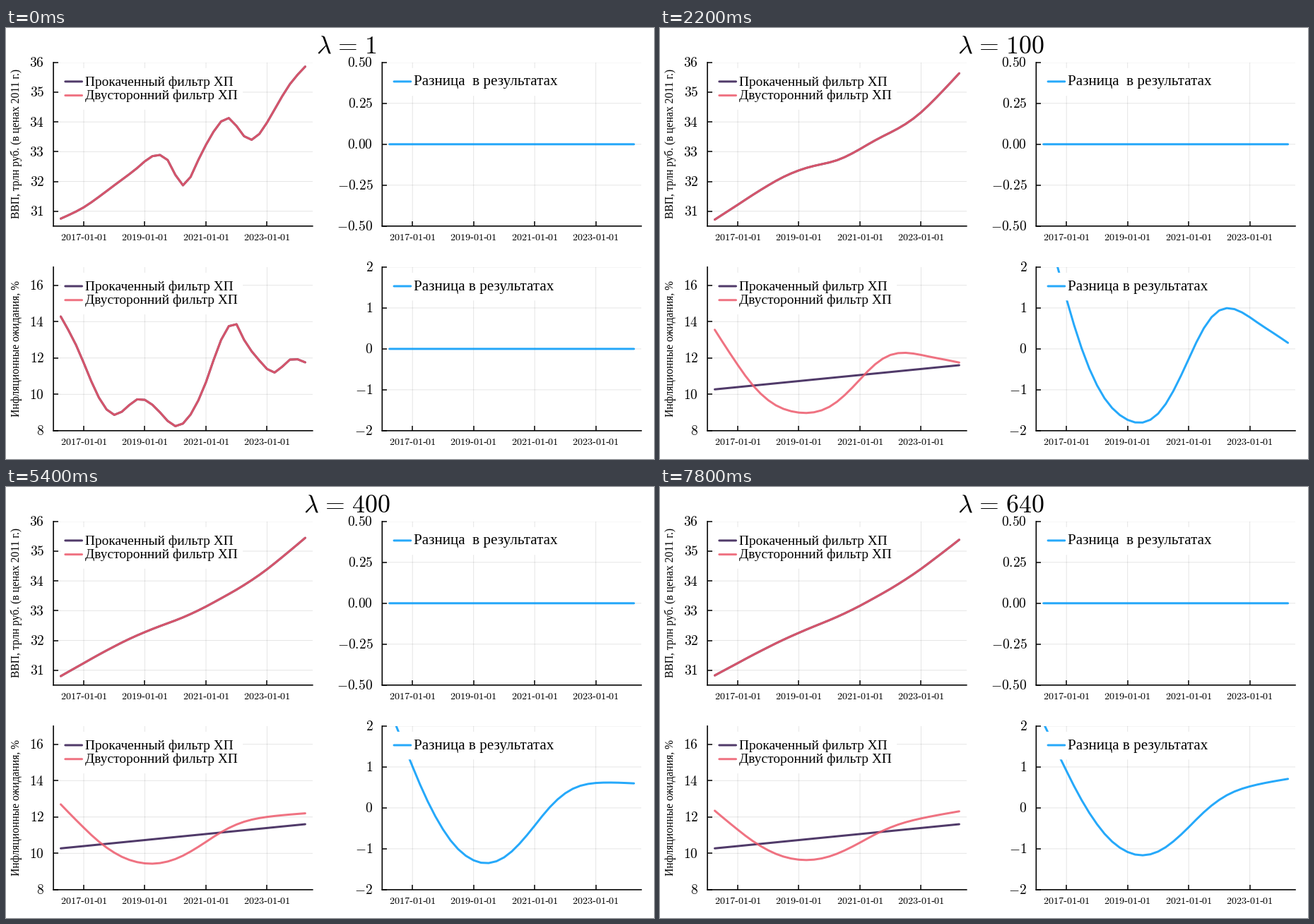
Recreate the animation shown at these times as a matplotlib script. Size 917 by 611 pixels, loop 8000 ms.

```python
import numpy as np
import matplotlib.pyplot as plt
from matplotlib.animation import FuncAnimation
from matplotlib.lines import Line2D
from matplotlib.patches import Rectangle
from matplotlib.transforms import Affine2D

W, H, DPI = 917, 611, 100
PT = 72 / DPI                      # points per pixel
plt.rcParams.update({"font.family": "Liberation Serif",
                     "mathtext.fontset": "cm",
                     "path.snap": False})

PURPLE = (49 / 255, 23 / 255, 79 / 255)
CORAL = (237 / 255, 90 / 255, 108 / 255)
BLUE = "#009afa"
ALPHA = 0.85

fig = plt.figure(figsize=(W / DPI, H / DPI), dpi=DPI, facecolor="white")
pixels = Affine2D().scale(1 / W, -1 / H).translate(0, 1) + fig.transFigure

# Quarterly dates in days
months = np.arange("2016-04", "2024-05", 3, dtype="datetime64[M]")
days = months.astype("datetime64[D]").astype(float)
pad = 0.03 * (days[-1] - days[0])
YEARS = range(2017, 2024, 2)
year_days = [np.datetime64(f"{y}-01-01").astype(float) for y in YEARS]

N = len(days)
second_diff = np.diff(np.eye(N), 2, axis=0)
PENALTY = second_diff.T @ second_diff


def smoother(lam):
    return np.linalg.inv(np.eye(N) + lam * PENALTY)


def raw_series(keys):
    """Smoothest path through {quarter: value}, with lambda = 1 undone."""
    weight, value = np.zeros(N), np.zeros(N)
    for k, v in keys.items():
        weight[k], value[k] = 1, v
    trend = np.linalg.solve(np.diag(weight) + 1e-6 * PENALTY, value)
    return trend + PENALTY @ trend


gdp = raw_series({0: 30.75, 3: 31.13, 7: 31.87, 10: 32.45, 13: 32.89,
                  14: 32.72, 16: 31.87, 18: 32.72, 20: 33.67, 22: 34.13,
                  24: 33.52, 25: 33.40, 27: 33.98, 30: 35.27, 32: 35.86})
infl = raw_series({0: 14.28, 2: 12.71, 5: 9.82, 7: 8.87, 10: 9.725,
                   13: 9.01, 15: 8.25, 17: 8.89, 19: 10.67, 22: 13.75,
                   23: 13.855, 24: 13.0, 26: 11.86, 28: 11.2, 30: 11.91,
                   32: 11.76})


def passes(lam):
    """Number of repeated filter passes for the inflation series."""
    if lam < 28:
        return 1
    return 2 if lam < 90 else 600


def lam_at(i):
    return 1 + 9 * i if i < 12 else 100 + 20 * (i - 12)


def label(x, y, s, px, **kw):
    return fig.text(x, y, s, transform=pixels, fontsize=px * PT,
                    **{"va": "baseline", **kw})


def panel(left, top, lo, hi, ticks, fmt):
    width, height = 366.7, 232
    ax = fig.add_axes([left / W, 1 - (top + height) / H, width / W, height / H])
    ax.set_xlim(days[0] - pad, days[-1] + pad)
    ax.set_ylim(lo, hi)
    ax.set_xticks(year_days)
    ax.set_yticks(ticks)
    ax.set_axisbelow(True)
    ax.grid(color="black", alpha=0.1, lw=1 * PT)
    ax.tick_params(direction="in", length=7 * PT, width=1.5 * PT,
                   labelleft=False, labelbottom=False)
    for side in ("top", "right"):
        ax.spines[side].set_visible(False)
    for side in ("left", "bottom"):
        ax.spines[side].set_linewidth(1.6 * PT)

    for t in ticks:
        y = top + height * (hi - t) / (hi - lo)
        label(left - 13, y + 6.4, f"${t:{fmt}}$", 19.5, ha="right")
    span = days[-1] - days[0] + 2 * pad
    for year, d in zip(YEARS, year_days):
        x = left + width * (d - days[0] + pad) / span
        label(x, top + height + 20, f"${year}$\u2010$01$\u2010$01$", 14.15,
              ha="center")
    return ax


def curve(ax, color):
    line, = ax.plot(days, np.zeros(N), color=color, alpha=ALPHA, lw=3 * PT,
                    solid_capstyle="round", solid_joinstyle="round")
    return line


def legend(left, top, width, px, entries):
    """White box over the plot with a line sample and a name per row."""
    row = 19.7
    fig.add_artist(Rectangle((left + 10, top + 8), width,
                             row * (len(entries) + 1), transform=pixels,
                             facecolor="white", edgecolor="none"))
    for k, (name, color) in enumerate(entries):
        y = top + 8 + row * (k + 1)
        fig.add_artist(Line2D([left + 16.7, left + 40.5], [y - 0.6] * 2,
                              transform=pixels, color=color, alpha=ALPHA,
                              lw=3 * PT, solid_capstyle="round"))
        label(left + 44.6, y + 5, name, px)


LEFT, RIGHT, TOP, BOTTOM = 67.1, 532.3, 48.8, 338.9
ax_gdp = panel(LEFT, TOP, 30.5, 36, range(31, 37), "d")
ax_gdp_gap = panel(RIGHT, TOP, -0.5, 0.5, np.linspace(-0.5, 0.5, 5), ".2f")
ax_infl = panel(LEFT, BOTTOM, 8, 17, range(8, 17, 2), "d")
ax_infl_gap = panel(RIGHT, BOTTOM, -2, 2, range(-2, 3), "d")

filters = [("Прокаченный фильтр ХП", PURPLE), ("Двусторонний фильтр ХП", CORAL)]
for top, gap_name in ((TOP, "Разница  в результатах"),
                      (BOTTOM, "Разница в результатах")):
    legend(LEFT, top, 258, 19.4, filters)
    legend(RIGHT, top, 246, 21.1, [(gap_name, BLUE)])

for y, name in ((164.5, "ВВП, трлн руб. (в ценах 2011 г.)"),
                (454.5, "Инфляционные ожидания, %")):
    label(19, y, name, 15.65, rotation=90, rotation_mode="anchor", ha="center")

TITLE_EM = 35.8
title = label(0, 36, "", TITLE_EM)
gdp_boost, gdp_two = curve(ax_gdp, PURPLE), curve(ax_gdp, CORAL)
infl_boost, infl_two = curve(ax_infl, PURPLE), curve(ax_infl, CORAL)
gdp_gap, infl_gap = curve(ax_gdp_gap, BLUE), curve(ax_infl_gap, BLUE)


def draw(i):
    lam = lam_at(i)
    s = smoother(lam)
    title.set_text(rf"$\lambda\hspace{{0.117}}=\hspace{{0.117}}{lam}$")
    # centre by advance width, so the digits' side bearings count
    title.set_x(482.4 - TITLE_EM * (1.92 + 0.5 * len(str(lam))) / 2)

    trend = s @ gdp
    gdp_boost.set_ydata(trend)
    gdp_two.set_ydata(trend)

    two = s @ infl
    boost = np.linalg.matrix_power(s, passes(lam)) @ infl
    infl_boost.set_ydata(boost)
    infl_two.set_ydata(two)
    infl_gap.set_ydata(two - boost)
    return title, gdp_boost, gdp_two, infl_boost, infl_two, infl_gap


anim = FuncAnimation(fig, draw, frames=40, interval=200, repeat=True,
                     repeat_delay=0, blit=False)
plt.show()
```
